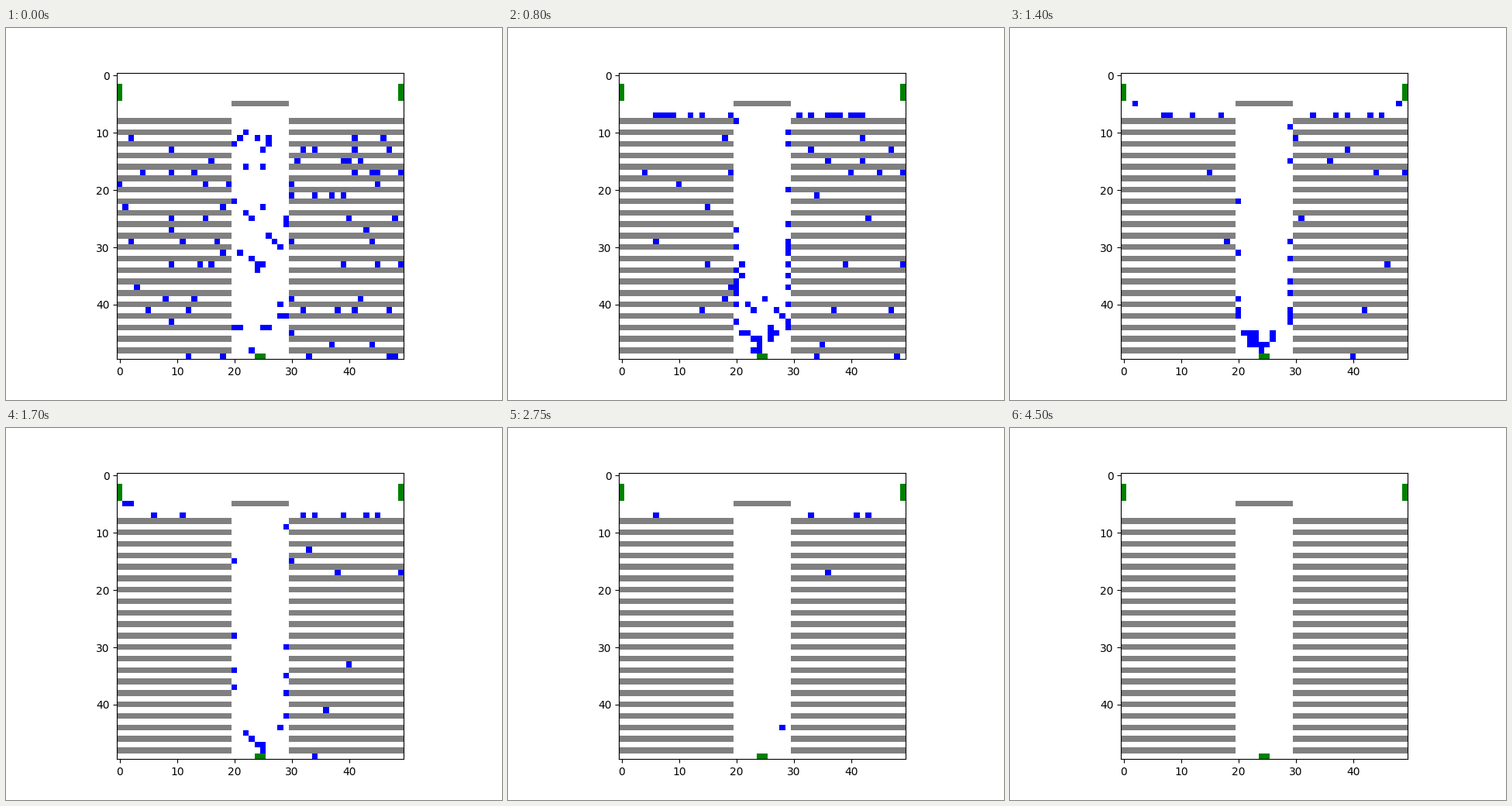
These frames come from a looping animation (640 by 480 pixels, 4550 ms). A matplotlib script:

```python
import numpy as np
import matplotlib.pyplot as plt
from matplotlib.animation import FuncAnimation
from matplotlib.colors import ListedColormap

SIZE, FRAMES, STEP_MS = 50, 91, 50
FREE, WALL, EXIT, PERSON = range(4)
COLOURS = ListedColormap(["white", "gray", "green", "blue"])
AISLE = range(20, 30)
CORRIDOR, SPLIT, FUNNEL = 7, 18, 47  # rows where the walking rule changes

# Starting crowd, row: columns. People move in the order listed.
CROWD = {
    10: [22], 11: [2, 21, 24, 26, 46, 41], 12: [20, 26],
    13: [9, 25, 47, 41, 34, 32], 15: [16, 40, 42, 39, 31], 16: [22, 25],
    17: [13, 4, 9, 45, 44, 41, 49], 19: [0, 15, 19, 30, 45],
    21: [30, 34, 37, 39], 22: [20], 23: [1, 18, 25], 24: [22],
    25: [15, 9, 23, 29, 48, 40], 26: [29], 27: [9, 43], 28: [26],
    29: [2, 11, 17, 27, 44, 30], 30: [28], 31: [18, 21], 32: [23],
    33: [9, 14, 16, 24, 25, 45, 39, 49], 34: [24], 37: [3],
    39: [13, 8, 30, 42], 40: [28], 41: [12, 5, 41, 38, 32, 47],
    42: [28, 29], 43: [9], 44: [20, 21, 25, 26], 45: [30],
    47: [37, 44], 48: [23], 49: [18, 12, 33, 47, 48],
}


def make_hall():
    hall = np.full((SIZE, SIZE), FREE)
    hall[8::2, :20] = hall[8::2, 30:] = WALL
    hall[5, 20:30] = WALL
    hall[2:5, [0, -1]] = EXIT
    hall[49, 24:26] = EXIT
    return hall


def seated(x, y):
    return x not in AISLE and y > CORRIDOR


def goal(x, y):
    """Next point to head for: aisle, then corridor or funnel, then exit."""
    left = x < 25
    if seated(x, y):
        turn = -1 if y < SPLIT else 1 if y < FUNNEL else 0
        return (20 if left else 29), y + turn
    if x not in AISLE:
        if left and x > 2:
            return 2, 5
        return (0 if left else 49), 4
    if y < SPLIT:
        return (19 if left else 30), CORRIDOR
    return (24 if left else 25), (FUNNEL if y < FUNNEL else 49)


def options(dx, dy):
    """Steps in order of preference: straight on, then aslant."""
    sx, sy = int(np.sign(dx)), int(np.sign(dy))
    if abs(dx) > abs(dy):
        return (sx, 0), (sx, sy), (0, sy)
    if abs(dx) == abs(dy):
        return (sx, sy), (0, sy), (sx, 0)
    side = sx or -1
    return (0, sy), (side, sy), (-side, sy)


def next_cell(x, y, taken):
    gx, gy = goal(x, y)
    for sx, sy in options(gx - x, gy - y):
        nx, ny = x + sx, y + sy
        inside = 0 <= nx < SIZE and 0 <= ny < SIZE
        back_to_seat = x in AISLE and seated(nx, ny)
        if (inside and not back_to_seat and hall[ny, nx] != WALL
                and (nx, ny) not in taken):
            return nx, ny
    return x, y


def must_wait(x, y, taken):
    """Only the person nearest the aisle may walk along a row of seats."""
    ahead = range(x + 1, 20) if x < 25 else range(30, x)
    return seated(x, y) and any((c, y) in taken for c in ahead)


def advance(people):
    taken, moved = set(people), []
    for cell in people:
        if not must_wait(*cell, taken):
            taken.remove(cell)
            cell = next_cell(*cell, taken)
        if hall[cell[1], cell[0]] == EXIT:
            continue
        taken.add(cell)
        moved.append(cell)
    return moved


def draw_grid(people):
    grid = hall.copy()
    for x, y in people:
        grid[y, x] = PERSON
    return grid


hall = make_hall()
people = [(x, y) for y, row in CROWD.items() for x in row]
grids = []
for _ in range(FRAMES):
    grids.append(draw_grid(people))
    people = advance(people)

fig, ax = plt.subplots(figsize=(6.4, 4.8), dpi=100)
image = ax.imshow(grids[0], cmap=COLOURS, vmin=0, vmax=3,
                  interpolation="nearest")


def update(t):
    image.set_data(grids[t])
    return [image]


anim = FuncAnimation(fig, update, frames=FRAMES, interval=STEP_MS, repeat=True)
plt.show()
```
